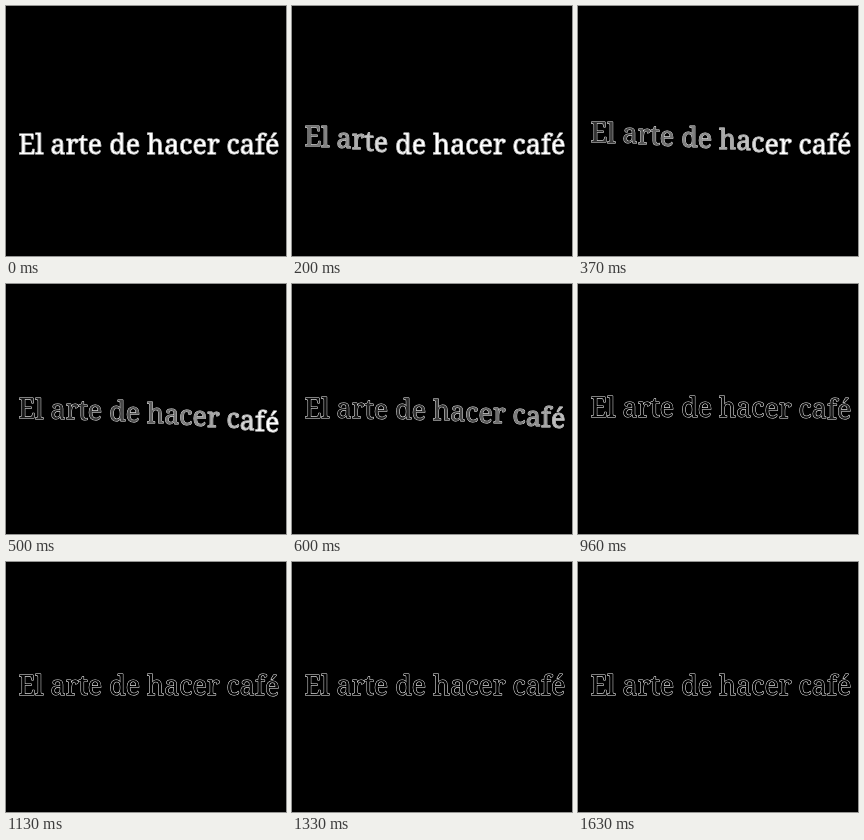
These frames come from a looping animation (280 by 250 pixels, 1.66 s). An HTML page with a canvas:

```html
<!DOCTYPE html>
<html lang="es">
<head>
<meta charset="utf-8">
<style>
  html, body { margin: 0; width: 100%; height: 100%; overflow: hidden; background: #000; }
  canvas { display: block; }
</style>
</head>
<body>
<canvas id="stage" width="280" height="250"></canvas>
<script>
const ctx = document.getElementById('stage').getContext('2d');
const TEXT = 'El arte de hacer café';
const LOOP = 1660, STEP = 100 / 3;
const LEFT = 12.5, BASELINE = 148, RISE = 15;
const STAGGER = 32.5, DURATION = 1100;

ctx.font = '26.9px "Noto Serif", serif';
ctx.lineJoin = 'round';
ctx.lineWidth = 1;

const letters = [...TEXT]
  .map((char, i) => ({ char, x: LEFT + ctx.measureText(TEXT.slice(0, i)).width }))
  .filter(letter => letter.char !== ' ');

const easeOut = t => 1 - (1 - t) ** 4;

function drawLetter({ char, x }, index, time) {
  const t = Math.min(1, Math.max(0, (time - index * STAGGER) / DURATION));
  const progress = easeOut(t);
  const y = BASELINE - RISE * progress;

  // A thin rim stays visible while the white fill fades out.
  ctx.strokeStyle = '#fff';
  ctx.strokeText(char, x, y);
  ctx.fillStyle = '#000';
  ctx.fillText(char, x, y);
  ctx.fillStyle = `rgba(255, 255, 255, ${1 - progress})`;
  ctx.fillText(char, x, y);
}

function draw(now) {
  const time = Math.floor((now % LOOP + 8) / STEP) * STEP;
  ctx.fillStyle = '#000';
  ctx.fillRect(0, 0, 280, 250);
  letters.forEach((letter, i) => drawLetter(letter, i, time));
  requestAnimationFrame(draw);
}
requestAnimationFrame(draw);
</script>
</body>
</html>
```
